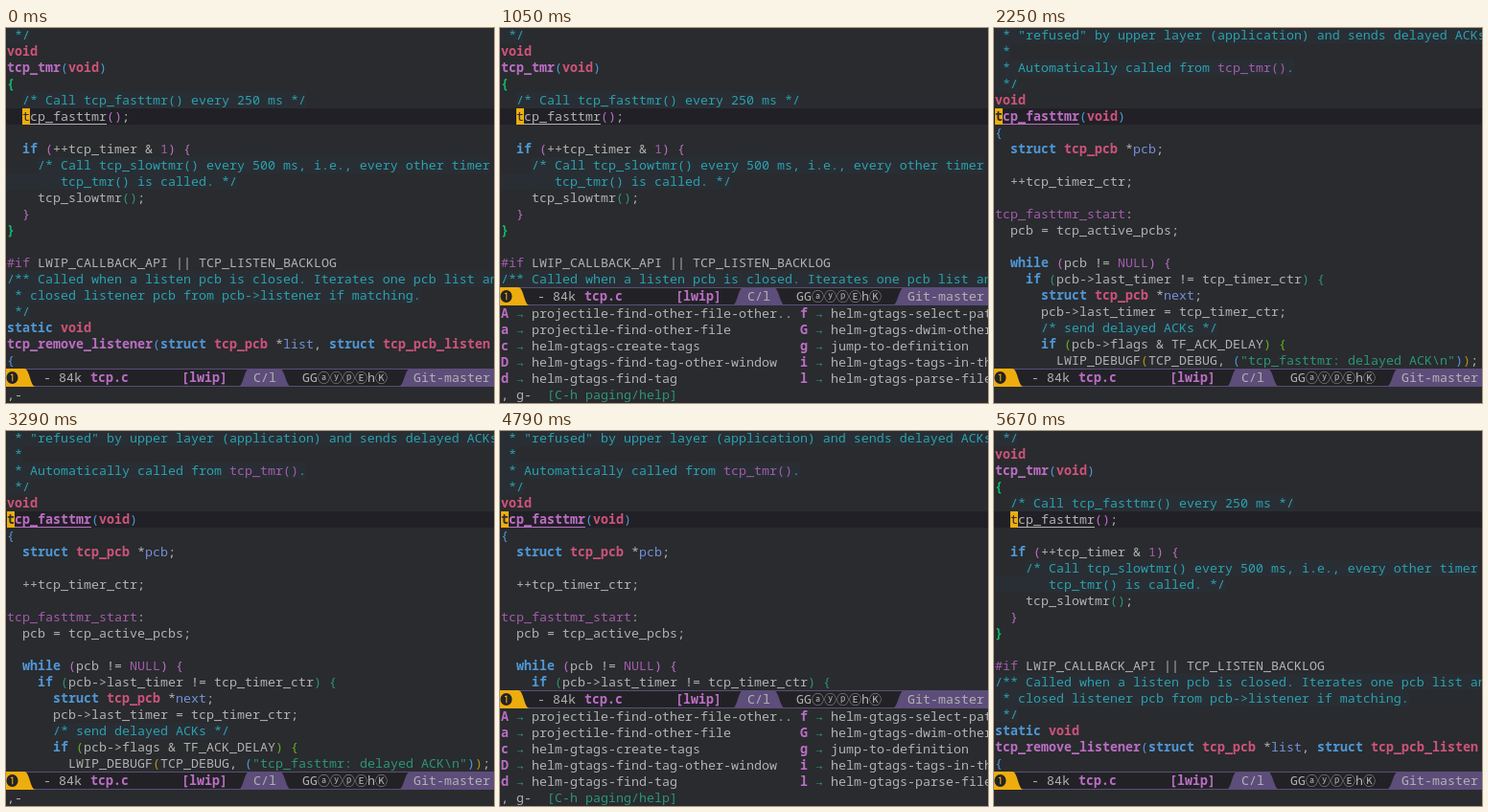
Write an HTML page with a canvas that moves like this. It is 509 px wide and 392 px high and loops after 7.47 s.

```html
<!DOCTYPE html>
<html lang="en">
<head>
<meta charset="utf-8">
<title>Jump to definition</title>
<style>
  html, body { margin: 0; width: 100%; height: 100%; overflow: hidden; background: #292b2e; }
  canvas { display: block; }
</style>
</head>
<body>
<canvas id="stage" width="509" height="392"></canvas>
<script>
const W = 509, H = 392, ROW = 17, CELL = 8, LEFT = 1, LOOP = 7470;
const ctx = document.getElementById('stage').getContext('2d');

const BG = '#292b2e', LINE_BG = '#212026', COMMENT_BG = '#292e34';
const BAR = '#222226', PURPLE = '#5d4d7a', GOLD = '#eead0e', TEXT = '#b2b2b2';
const MONO = '"Noto Sans Mono", "DejaVu Sans Mono", monospace';
const SYMBOL = '"Noto Sans CJK JP", "Noto Sans CJK SC", "DejaVu Sans", sans-serif';

// Style letter: [colour, bold, background]
const STYLES = {
  d: [TEXT],
  k: ['#4f97d7', true],
  t: ['#ce537a', true],
  f: ['#bc6ec5', true],
  c: ['#2aa1ae', false, COMMENT_BG],
  n: ['#a45bad', false, COMMENT_BG],
  s: ['#2d9574'],
  v: ['#7590db'],
  o: ['#a45bad'],
  m: ['#12b866', true],
  1: ['#4f97d7'],
  2: ['#bc6ec5'],
  3: ['#2d9574'],
  4: ['#67b11d'],
  5: ['#b1951d']
};

// "§x" switches to style x
const TIMER = [
  '§c */',
  '§tvoid',
  '§ftcp_tmr§1(§tvoid§1)',
  '§m{',
  '  §c/* Call tcp_fasttmr() every 250 ms */',
  '  tcp_fasttmr§2()§d;',
  '',
  '  §kif §2(§d++tcp_timer & §o1§2) {',
  '    §c/* Call tcp_slowtmr() every 500 ms, i.e., every other timer',
  '§c       tcp_tmr() is called. */',
  '    tcp_slowtmr§3()§d;',
  '  §2}',
  '§m}',
  '',
  '§o#if §dLWIP_CALLBACK_API || TCP_LISTEN_BACKLOG',
  '§c/** Called when a listen pcb is closed. Iterates one pcb list and',
  '§c * closed listener pcb from pcb->listener if matching.',
  '§c */',
  '§kstatic §tvoid',
  '§ftcp_remove_listener§1(§kstruct §ttcp_pcb §d*§vlist§d, §kstruct §ttcp_pcb_listen',
  '§1{'
];

const FAST_TIMER = [
  '§c * "refused" by upper layer (application) and sends delayed ACKs',
  '§c *',
  '§c * Automatically called from §ntcp_tmr()§c.',
  '§c */',
  '§tvoid',
  '§ftcp_fasttmr§1(§tvoid§1)',
  '§1{',
  '  §kstruct §ttcp_pcb §d*§vpcb§d;',
  '',
  '  ++tcp_timer_ctr;',
  '',
  '§otcp_fasttmr_start§d:',
  '  pcb = tcp_active_pcbs;',
  '',
  '  §kwhile §2(§dpcb != §oNULL§2) {',
  '    §kif §3(§dpcb->last_timer != tcp_timer_ctr§3) {',
  '      §kstruct §ttcp_pcb §d*§vnext§d;',
  '      pcb->last_timer = tcp_timer_ctr;',
  '      §c/* send delayed ACKs */',
  '      §kif §4(§dpcb->flags & TF_ACK_DELAY§4) {',
  '        LWIP_DEBUGF§5(§dTCP_DEBUG, §1(§s"tcp_fasttmr: delayed ACK\\n"§1)§5)§d;'
];

const entry = (key, name) => `§f${key} §s→ §d${name}`;
const pair = (k1, n1, k2, n2) => entry(k1, n1.padEnd(35)) + entry(k2, n2);

const SHORT_MENU = [entry('D', 'disaster ') + '§fg §s→ §1+prefix'];
const LONG_MENU = [
  pair('A', 'projectile-find-other-file-other..', 'f', 'helm-gtags-select-path'),
  pair('a', 'projectile-find-other-file', 'G', 'helm-gtags-dwim-other-window'),
  pair('c', 'helm-gtags-create-tags', 'g', 'jump-to-definition'),
  pair('D', 'helm-gtags-find-tag-other-window', 'i', 'helm-gtags-tags-in-this-function'),
  pair('d', 'helm-gtags-find-tag', 'l', 'helm-gtags-parse-file')
];
const HELP = '  §s[C-h paging/help]';

// [start, menu, echo text]
const STEPS = [
  [0, [], ',-'],
  [150, SHORT_MENU, ',-' + HELP],
  [600, SHORT_MENU, ', g-'],
  [1050, LONG_MENU, ', g-' + HELP],
  [1950, [], ''],
  [3290, [], ',-'],
  [3590, SHORT_MENU, ',-' + HELP],
  [4340, SHORT_MENU, ', g-'],
  [4790, LONG_MENU, ', g-' + HELP],
  [5530, [], '']
];

const within = (t, a, b) => t >= a && t < b;

function rect(x, y, w, h, color) {
  ctx.fillStyle = color;
  ctx.fillRect(x, y, w, h);
}

function write(text, x, y, color, bold) {
  ctx.font = `${bold ? 'bold ' : ''}13.333px ${MONO}`;
  ctx.fillStyle = color;
  ctx.fillText(text, x, y);
}

function styledLine(line, top) {
  let x = LEFT;
  for (const run of ('§d' + line).split('§').slice(1)) {
    const [color, bold, back] = STYLES[run[0]];
    const text = run.slice(1);
    const width = text.length * CELL;
    if (back) rect(x, top, width, ROW, back);
    if (text.trim()) write(text, x, top + 13, color, bold);
    x += width;
  }
}

function symbol(char, x, y, size, color) {
  ctx.font = `${size}px ${SYMBOL}`;
  ctx.fillStyle = color;
  ctx.textAlign = 'center';
  ctx.fillText(char, x, y);
  ctx.textAlign = 'left';
}

// Segment with wavy sides; l and r are [x at top, x at bottom]
function segment(l, r, top, color) {
  const bottom = top + 19;
  const ml = (l[0] + l[1]) / 2, mr = (r[0] + r[1]) / 2;
  ctx.beginPath();
  ctx.moveTo(l[0], top);
  ctx.lineTo(r[0], top);
  ctx.bezierCurveTo(mr, top, mr, bottom, r[1], bottom);
  ctx.lineTo(l[1], bottom);
  ctx.bezierCurveTo(ml, bottom, ml, top, l[0], top);
  ctx.fillStyle = color;
  ctx.fill();
}

function modeLine(top) {
  const base = top + 14;
  rect(0, top, W, 19, BAR);
  rect(0, top, W, 1, PURPLE);
  rect(0, top + 18, W, 1, PURPLE);
  segment([0, 0], [19, 31], top, GOLD);
  segment([254, 242], [285, 298], top, PURPLE);
  segment([422, 409], [W, W], top, PURPLE);
  symbol('❶', 6.5, base, 13, BAR);
  write('-', 39, base, TEXT);
  write('84k', 55, base, TEXT);
  write('tcp.c', 88, base, '#bc6ec5', true);
  write('[lwip]', 183, base, '#bc6ec5', true);
  write('C/l', 258, base, TEXT);
  write('GG', 309, base, TEXT);
  [...'ⓐⓨⓟⒺ'].forEach((c, i) => symbol(c, 331.5 + i * 13, base, 13, TEXT));
  write('h', 377, base, TEXT);
  symbol('Ⓚ', 391.5, base, 13, TEXT);
  write('Git-master', 425, base, TEXT);
}

function cursorLine(jumped, t, marked) {
  const top = 5 * ROW - 1;
  const col = jumped ? 0 : 2;
  const x = LEFT + col * CELL;
  let back = LINE_BG;
  if (within(t, 1950, 2100)) back = '#928c27';
  else if (within(t, 2100, 2250)) back = '#5a5627';
  rect(0, top, W, ROW, back);
  styledLine((jumped ? FAST_TIMER : TIMER)[5], top);
  if (marked) rect(x, top + 16, 11 * CELL, 1, jumped ? '#bc6ec5' : TEXT);
  rect(x, top, CELL, ROW, GOLD);
  write('t', x, top + 13, BG, jumped);
}

function draw(t) {
  const [, menu, echo] = STEPS.filter(s => s[0] <= t).pop();
  const jumped = within(t, 1950, 5530);
  const marked = !within(t, 1950, 2100) && !within(t, 5530, 5670);
  const barTop = 356 - menu.length * ROW;

  rect(0, 0, W, H, BG);
  (jumped ? FAST_TIMER : TIMER).forEach((line, i) => {
    if (i === 5) cursorLine(jumped, t, marked);
    else styledLine(marked ? line : line.replace('§m', '§1'), i * ROW - 1);
  });

  rect(0, barTop, W, H - barTop, BG);
  modeLine(barTop);
  menu.forEach((line, i) => styledLine(line, barTop + 19 + i * ROW));
  styledLine(echo, 375);
}

const start = performance.now();
function tick() {
  draw((performance.now() - start) % LOOP);
  requestAnimationFrame(tick);
}
tick();
</script>
</body>
</html>
```
